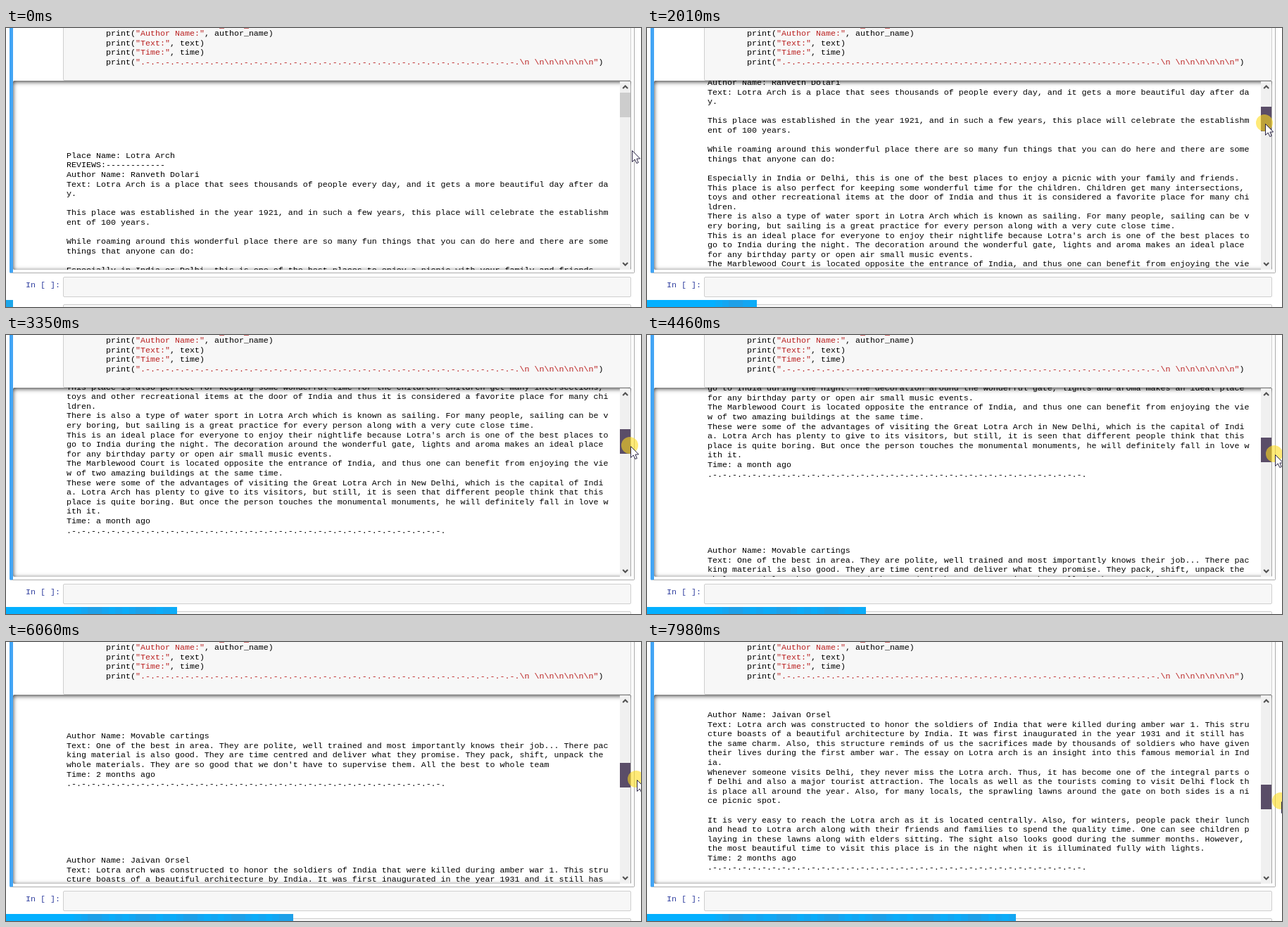
An HTML page with a canvas that plays this animation: 902 px wide and 397 px high, repeating every 8000 ms.

```html
<!DOCTYPE html>
<html lang="en">
<head>
<meta charset="utf-8">
<title>Notebook output scrolling</title>
<style>
  html, body { margin: 0; width: 100%; height: 100%; overflow: hidden; background: #fff; }
  #stage { position: relative; width: 902px; height: 397px; overflow: hidden; }
  #stage > *, #out pre { position: absolute; box-sizing: border-box; margin: 0; }
  pre { font: 11.67px/13.6px "Liberation Mono", monospace; color: #000; white-space: pre; }
  pre b { font-weight: normal; color: #ba2121; }
  .input { left: 81px; width: 807px; background: #f7f7f7; border: 1px solid #cfcfcf; border-radius: 2px; }
  #cell { left: 5px; top: -10px; width: 888px; height: 359px; border: 1px solid #ababab; border-left: 5px solid #42a5f5; border-radius: 2px; }
  #out { left: 10px; top: 75px; width: 878px; height: 269px; overflow: hidden; border-radius: 2px;
         box-shadow: inset 0 1.6px 6.4px rgba(0, 0, 0, .8); }
  #log { left: 76px; top: 100.9px; }
  #code { left: 142px; top: 2px; }
  #prompt { left: 28px; top: 359.6px; color: #303f9f; }
</style>
</head>
<body>
<div id="stage">
  <div id="cell"></div>
  <div class="input" style="top:-10px;height:85px"></div>
  <div class="input" style="top:354px;height:29px"></div>
  <div class="input" style="top:393px;height:29px"></div>
  <pre id="code"></pre>
  <pre id="prompt">In [ ]:</pre>
  <div id="out"><pre id="log"></pre></div>
  <canvas id="view" width="902" height="397"></canvas>
</div>
<script>
const $ = id => document.getElementById(id);
const rule = ".-".repeat(38) + ".";

$("code").innerHTML = [
  'print(<b>"Author Name:"</b>, author_name)',
  'print(<b>"Text:"</b>, text)',
  'print(<b>"Time:"</b>, time)',
  `print(<b>"${rule}\\n \\n\\n\\n\\n\\n\\n"</b>)`
].join("\n");

const gap = "\n".repeat(8);
$("log").textContent = `Place Name: Lotra Arch
REVIEWS:------------
Author Name: Ranveth Dolari
Text: Lotra Arch is a place that sees thousands of people every day, and it gets a more beautiful day after da
y.

This place was established in the year 1921, and in such a few years, this place will celebrate the establishm
ent of 100 years.

While roaming around this wonderful place there are so many fun things that you can do here and there are some
things that anyone can do:

Especially in India or Delhi, this is one of the best places to enjoy a picnic with your family and friends.
This place is also perfect for keeping some wonderful time for the children. Children get many intersections,
toys and other recreational items at the door of India and thus it is considered a favorite place for many chi
ldren.
There is also a type of water sport in Lotra Arch which is known as sailing. For many people, sailing can be v
ery boring, but sailing is a great practice for every person along with a very cute close time.
This is an ideal place for everyone to enjoy their nightlife because Lotra's arch is one of the best places to
go to India during the night. The decoration around the wonderful gate, lights and aroma makes an ideal place
for any birthday party or open air small music events.
The Marblewood Court is located opposite the entrance of India, and thus one can benefit from enjoying the vie
w of two amazing buildings at the same time.
These were some of the advantages of visiting the Great Lotra Arch in New Delhi, which is the capital of Indi
a. Lotra Arch has plenty to give to its visitors, but still, it is seen that different people think that this
place is quite boring. But once the person touches the monumental monuments, he will definitely fall in love w
ith it.
Time: a month ago
${rule}${gap}Author Name: Movable cartings
Text: One of the best in area. They are polite, well trained and most importantly knows their job... There pac
king material is also good. They are time centred and deliver what they promise. They pack, shift, unpack the
whole materials. They are so good that we don't have to supervise them. All the best to whole team
Time: 2 months ago
${rule}${gap}Author Name: Jaivan Orsel
Text: Lotra arch was constructed to honor the soldiers of India that were killed during amber war 1. This stru
cture boasts of a beautiful architecture by India. It was first inaugurated in the year 1931 and it still has
the same charm. Also, this structure reminds of us the sacrifices made by thousands of soldiers who have given
their lives during the first amber war. The essay on Lotra arch is an insight into this famous memorial in Ind
ia.
Whenever someone visits Delhi, they never miss the Lotra arch. Thus, it has become one of the integral parts o
f Delhi and also a major tourist attraction. The locals as well as the tourists coming to visit Delhi flock th
is place all around the year. Also, for many locals, the sprawling lawns around the gate on both sides is a ni
ce picnic spot.

It is very easy to reach the Lotra arch as it is located centrally. Also, for winters, people pack their lunch
and head to Lotra arch along with their friends and families to spend the quality time. One can see children p
laying in these lawns along with elders sitting. The sight also looks good during the summer months. However,
the most beautiful time to visit this place is in the night when it is illuminated fully with lights.
Time: 2 months ago
${rule}`;

const LOOP = 8000, GRAB = 8;
// Bursts of screen updates: first time, last time, count
const bursts = [[70, 1060, 9], [1230, 2180, 7], [2320, 3350, 8], [3490, 4460, 7],
  [4620, 5570, 7], [5730, 6680, 7], [6840, 7810, 7], [7980, 7980, 1]];
// Drag path: step, scroll offset, pointer x
const drag = [[GRAB, 0, 876], [15, 131, 878], [24, 284, 887], [31, 364, 892],
  [41, 537, 896], [45, 624, 898], [53, 744, 901]];

function stepAt(t) {
  let n = 0;
  for (const [a, b, count] of bursts) {
    if (t < a) break;
    const gapMs = (b - a) / (count - 1) || LOOP;
    n += Math.min(count, 1 + Math.floor((t - a + 15) / gapMs));
  }
  return n;
}

function along(n, col) {
  if (n <= drag[0][0]) return drag[0][col];
  const i = drag.findIndex(p => p[0] >= n);
  const a = drag[i - 1], b = drag[i];
  return a[col] + (b[col] - a[col]) * (n - a[0]) / (b[0] - a[0]);
}

const c = $("view").getContext("2d");

function box(x, y, w, h, color) {
  c.fillStyle = color;
  c.fillRect(x, y, w, h);
}

function chevron(y, d) {
  c.beginPath();
  c.moveTo(876.2, y + 2 * d);
  c.lineTo(879.7, y - 1.5 * d);
  c.lineTo(883.2, y + 2 * d);
  c.lineWidth = 2;
  c.strokeStyle = "#505050";
  c.stroke();
}

function pointer(x, y) {
  const pts = [[0, 0], [0, 16], [3.7, 12.5], [6.3, 18], [8.8, 17], [6.4, 11.6], [11.2, 11.4]];
  c.beginPath();
  for (const [dx, dy] of pts) c.lineTo(x + dx + .5, y + dy + .5);
  c.closePath();
  c.fillStyle = "#fff";
  c.fill();
  c.lineWidth = 1;
  c.strokeStyle = "#2a2444";
  c.stroke();
}

function progress(n) {
  const end = Math.round(10 + 9.7 * n);
  if (n === 0) return box(0, 387, end, 10, "#1ba6ea");
  box(0, 387, end, 10, "#04b0ff");
  for (let i = 10; i <= n; i++) {
    const x = Math.round(10 + 9.7 * i);
    const shade = ["#14a6f2", "#0cacf8", "#1ea0e8"][(i * i + i * 3) % 7 % 3];
    box(x - 10, 387, Math.min(10, end - x + 10), 10, shade);
  }
}

function draw(n) {
  const scroll = Math.round(along(n, 1));
  $("log").style.transform = `translateY(${-scroll}px)`;

  c.clearRect(0, 0, 902, 397);
  box(303, 0, 7, 1, "#c96a6a");
  box(338, 0, 7, 1, "#c96a6a");

  box(872, 76, 15, 268, "#f0f0f0");
  chevron(84, 1);
  chevron(336, -1);
  const top = 92 + Math.round(scroll / 6.71), held = n >= GRAB;
  box(872, top, 15, 35, held ? "#5a4d68" : n >= GRAB - 2 ? "#a6a6a6" : "#cdcdcd");

  progress(n);

  let x = along(n, 2), y = top + 24;
  if (held) {
    c.beginPath();
    c.arc(x - 1, y - 1, 12, 0, 7);
    c.fillStyle = "rgba(255,220,30,.6)";
    c.fill();
  } else {
    const u = n / GRAB, e = u * u * (3 - 2 * u);
    x = 889 + (x - 889) * e;
    y = 174 + (y - 174) * e;
  }
  pointer(Math.round(x), Math.round(y));
}

let shown = -1;
function tick() {
  const n = stepAt(performance.now() % LOOP);
  if (n !== shown) draw(shown = n);
  requestAnimationFrame(tick);
}
tick();
</script>
</body>
</html>
```
